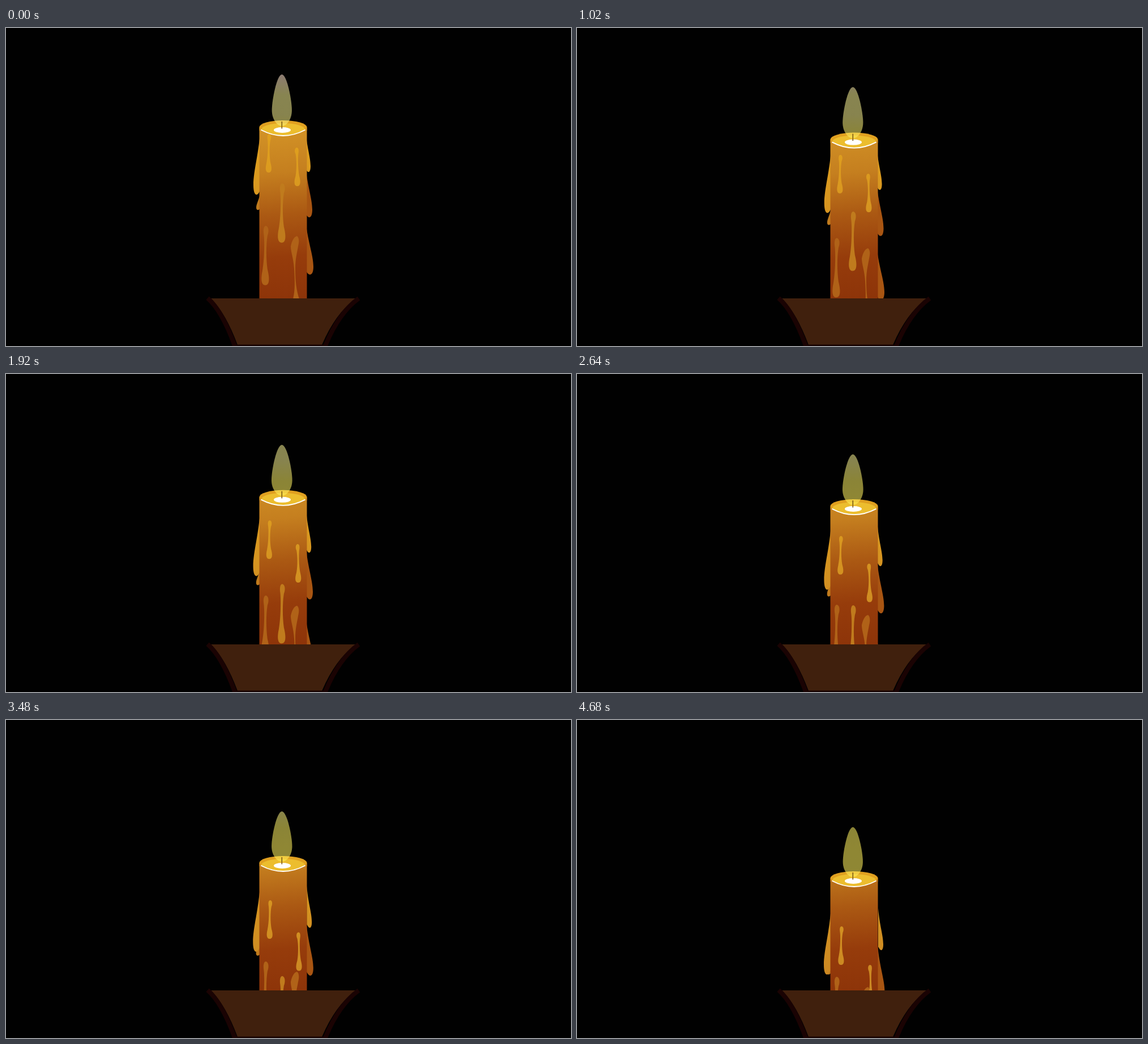
An HTML page with a canvas that plays this animation: 998 px wide and 561 px high, repeating every 4740 ms.

```html
<!DOCTYPE html>
<html lang="en">
<head>
<meta charset="utf-8">
<title>Melting candle</title>
<style>
  html, body { margin: 0; height: 100%; overflow: hidden; background: #010101; }
  canvas { display: block; }
</style>
</head>
<body>
<canvas id="stage" width="998" height="561"></canvas>
<script>
const ctx = document.getElementById('stage').getContext('2d');
const LOOP = 4740, STEP = 60, LAST = LOOP - STEP;
const SINK = 104; // how far the candle top melts down

// Evenly spaced colours along a line that stays fixed to the stage
function shade(x0, y0, x1, y1, ...colours) {
  const g = ctx.createLinearGradient(x0, y0, x1, y1);
  colours.forEach((c, i) => g.addColorStop(i / (colours.length - 1), c));
  return g;
}

const wax = shade(478, 180, 505, 477, '#d29226', '#c57f1f', '#ab5913', '#963c0b', '#8d3409');
const glow = shade(0, 82, 0, 225, '#ffe0d08c', '#f6f0928c', '#f6ef8e8c', '#fcf0628c', '#fff05c8f');
const amber = shade(0, 200, 0, 450, '#e0a01e', '#cb8823');
const ochre = '#c07b1d', copper = '#b06218', rust = '#a85512';

// Unit outlines, scaled to each drip
const run = new Path2D('M-2 0C1 40 10 65 10 86C10 95 8 100 5 100C2 100 0 95-2 92Z');
const drop = new Path2D('M1 0C5 1 5 7 3 11C1 21 1 38 3 50C6 60 6 68 0 68C-6 68-6 60-4 52C-1 38-1 16-2 10C-3 4-2 0 1 0Z');
const leaf = new Path2D('M7 0C11 3 11 10 9 18C7 30 4 40 4 58C4 80 6 96 11 111V150H0V111C4 95 3 78 2 58C1 40-4 28-4 18C-2 8 2 1 7 0Z');

// Negative sx mirrors the outline; fall and drift are the travel over one loop
const sideDrips = [
  { path: run, x: 448, y: 290, sx: -.6, sy: .31, fall: 128, drift: -.5, fill: ochre },
  { path: run, x: 448, y: 172, sx: -1.1, sy: 1.22, fall: 155, drift: -1, fill: amber },
  { path: run, x: 530.5, y: 180, sx: .75, sy: .74, fall: 152, drift: 3, fill: amber },
  { path: run, x: 530.5, y: 238, sx: 1.05, sy: .96, fall: 158, drift: 2.5, fill: rust },
  { path: run, x: 531, y: 335, sx: 1.2, sy: 1, fall: 215, drift: 0, fill: rust }
];
const frontDrips = [
  { path: leaf, x: 507, y: 367, sx: 1, sy: 1, fall: SINK, drift: 0, fill: copper },
  { path: drop, x: 458, y: 349, sx: 1.3, sy: 1.54, fall: SINK, drift: 0, fill: copper },
  { path: drop, x: 487, y: 274, sx: 1.3, sy: 1.54, fall: 240, drift: 0, fill: ochre },
  { path: drop, x: 464, y: 187, sx: 1, sy: 1, fall: 177, drift: 2.5, fill: amber },
  { path: drop, x: 514.5, y: 211, sx: -1, sy: 1, fall: 221, drift: 4, fill: amber }
];

const body = new Path2D('M447.5 176L451 180Q489.5 200 528 180L531.5 176V700H447.5Z');
const rimEdge = new Path2D('M451 180Q489.5 200 528 180');
const flame = new Path2D('M0 0C9 0 18 45 18 63C18 80 8 91 0 91C-8 91-18 80-18 63C-18 45-9 0 0 0Z');
const bowl = new Path2D('M362 477H618Q582 503 558 559H409Q388 503 362 477Z');
const bowlSides = new Path2D('M356 476.5Q382 499 405 563M623 477Q587 503 563 563');

function placed(path, x, y, sx = 1, sy = 1) {
  const p = new Path2D();
  p.addPath(path, new DOMMatrix([sx, 0, 0, sy, x, y]));
  return p;
}

function fill(path, style) {
  ctx.fillStyle = style;
  ctx.fill(path);
}

function stroke(path, style, width, cap) {
  ctx.strokeStyle = style;
  ctx.lineWidth = width;
  ctx.lineCap = cap;
  ctx.stroke(path);
}

function ellipse(x, y, rx, ry, style) {
  const p = new Path2D();
  p.ellipse(x, y, rx, ry, 0, 0, 2 * Math.PI);
  fill(p, style);
}

function rect(x, y, w, h, style) {
  ctx.fillStyle = style;
  ctx.fillRect(x, y, w, h);
}

function drawDrips(drips, k) {
  for (const d of drips) {
    fill(placed(d.path, d.x + d.drift * k, d.y + d.fall * k, d.sx, d.sy), d.fill);
  }
}

function draw(t) {
  // Melting begins one step into the loop
  const k = Math.max(0, (t - STEP) / (LAST - STEP)), sink = SINK * k;
  rect(0, 0, 998, 561, '#010101');
  drawDrips(sideDrips, k);

  const front = placed(body, 0, sink);
  ellipse(489.5, 175 + sink, 42, 12, '#e0a020');
  rect(447.5, 175 + sink, 84, 6, '#e0a020');
  ellipse(489.5, 179 + sink, 38.5, 11, '#ecbd2e');
  fill(front, wax);

  ctx.save();
  ctx.clip(front);
  drawDrips(frontDrips, k);
  ctx.restore();

  stroke(placed(rimEdge, 0, sink), '#fff', 1.8, 'round');
  ellipse(488, 180 + sink, 15, 5, '#fff');

  // The flame gets a little shorter and swells midway
  const tip = 82 + (SINK + 3) * k, base = 173 + sink;
  fill(placed(flame, 487.3, tip, .98 + .04 * Math.sin(Math.PI * k), (base - tip) / 91), glow);
  rect(486.5, 165 + sink, 1.6, 12.5, '#7a5712');

  fill(bowl, '#40200d');
  rect(402, 558.5, 163, 2.5, '#160202');
  stroke(bowlSides, '#1a0303', 8, 'butt');
}

const start = performance.now();
function tick() {
  const t = (performance.now() - start) % LOOP;
  draw(Math.floor(t / STEP) * STEP);
  requestAnimationFrame(tick);
}
tick();
</script>
</body>
</html>
```
